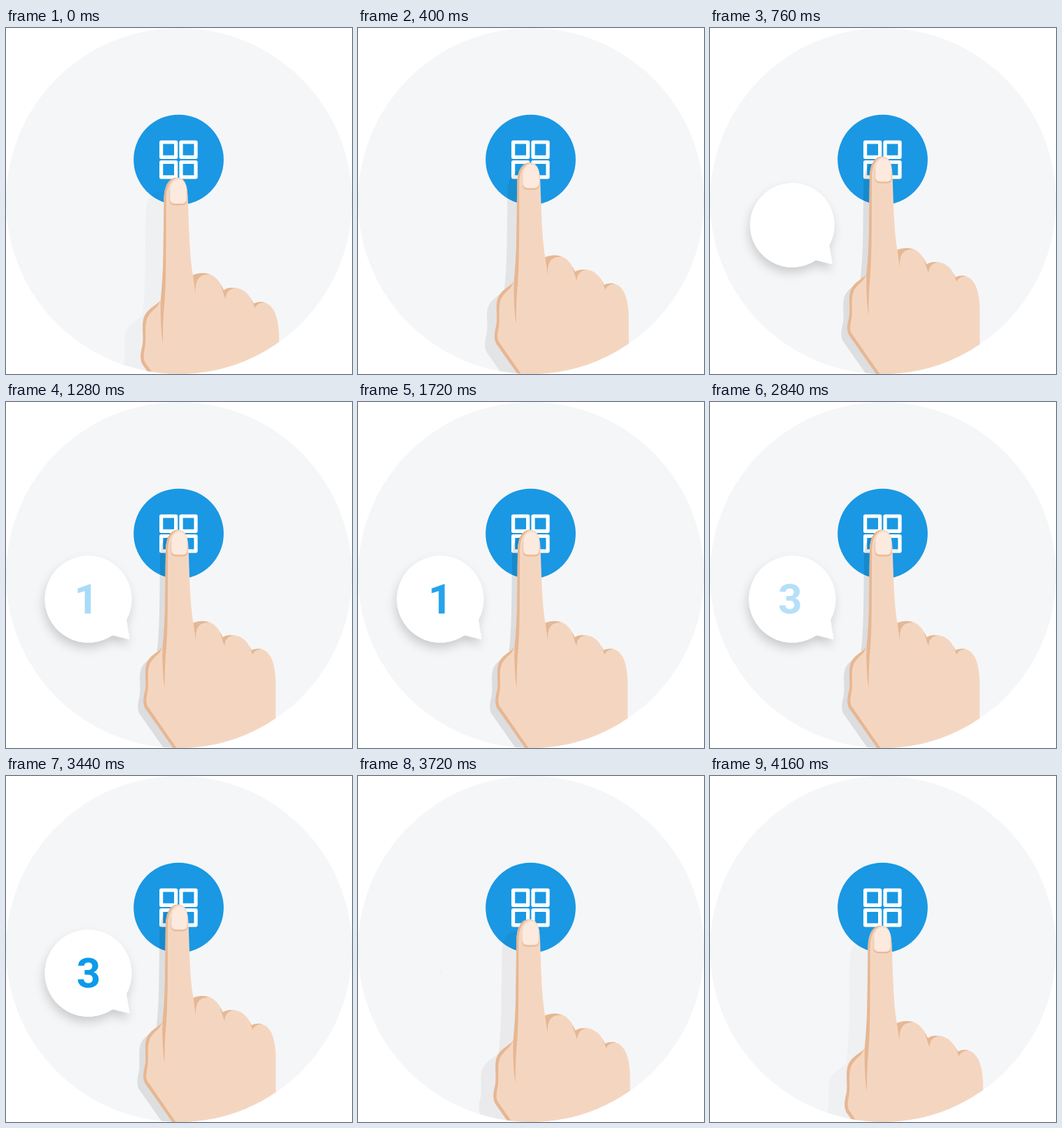
An HTML page for the animation above (4.24 s loop, 494 by 494 pixels).

```html
<!DOCTYPE html>
<html lang="en">
<head>
<meta charset="utf-8">
<title>Press and count</title>
<style>
  html, body { margin: 0; width: 100%; height: 100%; overflow: hidden; background: #fff; }
  svg { display: block; width: 100vw; height: 100vh; }
  text { font: 700 60px Roboto, Arial, sans-serif; fill: #0d9aea; }
</style>
</head>
<body>
<svg viewBox="0 0 494 494">
  <defs>
    <clipPath id="stage"><circle cx="247" cy="247" r="247"/></clipPath>
    <filter id="soft" x="-30%" y="-30%" width="160%" height="160%">
      <feDropShadow dx="-2" dy="8" stdDeviation="7" flood-color="#000" flood-opacity=".17"/>
    </filter>
    <path id="outline" d="M246 182.500C235 182.500 228.500 193 228 212L227 290C226.500 315 225 335 223.500 350
      C217 358 205 361 200.500 374C197 386 201 400 198.500 412C196 422 195 430 198.500 437L240 496L250 540H385V398
      C384 360 370 347 350.500 354.500C341 332 323 329 309.500 336C300 313 285 309 267.500 315.500
      C265 302 263 280 262 250L260.500 208C260 192 256 182.500 246 182.500Z"/>
  </defs>

  <circle cx="247" cy="247" r="247" fill="#f5f6f8"/>
  <circle cx="246.500" cy="188" r="64.300" fill="#1a98e3"/>
  <g fill="none" stroke="#fff" stroke-width="5.200" stroke-linejoin="round">
    <rect x="221.600" y="163" width="21" height="21.300"/>
    <rect x="250" y="163" width="21" height="21.300"/>
    <rect x="221.600" y="191.500" width="21" height="21.300"/>
    <rect x="250" y="191.500" width="21" height="21.300"/>
  </g>

  <g clip-path="url(#stage)">
    <use id="shadow" href="#outline"/>
    <g id="hand">
      <use href="#outline" fill="#f4d6c0"/>
      <g fill="#e6b793">
        <path d="M246 182.500C235 182.500 228.500 193 228 212L227 290C226.500 315 225 335 223.500 350
          C223 372 224 393 226.500 409C226.500 390 227 370 229 350C231 325 231 290 231 212C231 196 236 186 246 182.500Z"/>
        <path d="M223.500 350C217 358 205 361 200.500 374C197 386 201 400 198.500 412C196 422 195 430 198.500 437
          L240 496H245L202 434C199 428 201 421 202.500 411C204 398 201 386 205 375C207 369 214 363 219 358Z"/>
        <path d="M267.500 315.500C276 312 284 312 290 315C276 314 269 322 271.500 345Z"/>
        <path d="M305 328L309.500 336C314 333 320 332 325 333.500C317 334 312 340 312 349Z"/>
        <path d="M347 348L350.500 354.500C355 352 361 351.500 366 353C358 353 354 356 352 361Z"/>
      </g>
      <path d="M235.500 200V213Q235.500 220.500 243 220.500H252Q259.500 220.500 259.500 213V200Z" fill="#e6bb9b"/>
      <path d="M247.500 185C240 185 236.300 193 236.300 201V211Q236.300 217.800 243 217.800H252Q258.800 217.800 258.800 211V201
        C258.800 193 255 185 247.500 185Z" fill="#fdeadf" stroke="#f9dfd0" stroke-width="1"/>
    </g>
  </g>

  <g id="bubble">
    <path d="M152 333A62 62 0 1 1 172 311L176.500 339Z" fill="#fff" filter="url(#soft)"/>
    <text id="digit" x="118" y="301.500" text-anchor="middle">1</text>
  </g>
</svg>
<script>
const LOOP = 4240, STEP = 40;
const COUNT_START = 1000, COUNT_SLOT = 800;
const [hand, shadow, bubble, digit] =
  ["hand", "shadow", "bubble", "digit"].map(id => document.getElementById(id));

const clamp = (v, lo = 0, hi = 1) => Math.min(hi, Math.max(lo, v));
const mix = (a, b, k) => a + (b - a) * k;
const bezier = (a, b, s) => 3 * a * s * (1 - s) ** 2 + 3 * b * s * s * (1 - s) + s ** 3;

// cubic-bezier(.25, .1, .25, 1)
function ease(u) {
  if (u <= 0 || u >= 1) return clamp(u);
  let lo = 0, hi = 1;
  for (let i = 0; i < 24; i++) {
    const mid = (lo + hi) / 2;
    if (bezier(.25, .25, mid) < u) lo = mid; else hi = mid;
  }
  return bezier(.1, 1, lo);
}

const span = (t, start, length) => ease((t - start) / length);

function drawHand(press) {
  const scale = mix(1.047, 1, press);
  const x = mix(-13.2, 0, press), y = mix(22.4, 0, press);
  const place = (dx, dy) => `translate(${x + dx} ${y + dy}) scale(${scale})`;
  hand.setAttribute("transform", place(0, 0));
  shadow.setAttribute("transform", place(mix(-26, -8, press), mix(21, 8, press)));
  shadow.setAttribute("opacity", mix(.025, .1, press));
}

function drawBubble(t) {
  const size = span(t, 400, 460) - span(t, 3440, 400);
  bubble.setAttribute("visibility", size > .001 ? "visible" : "hidden");
  bubble.setAttribute("opacity", clamp(size * 1.5));
  bubble.setAttribute("transform", `translate(118 281) scale(${size}) translate(-118 -281)`);

  const elapsed = t - COUNT_START;
  const index = clamp(Math.floor(elapsed / COUNT_SLOT), 0, 2);
  const shown = clamp((elapsed - index * COUNT_SLOT) / COUNT_SLOT);
  digit.textContent = index + 1;
  digit.setAttribute("opacity", shown);
  digit.setAttribute("x", 118 - 5 * (1 - shown));
}

function render(now) {
  const t = Math.floor((now % LOOP) / STEP) * STEP;
  drawHand(span(t, 0, 1000) - span(t, 3400, 760));
  drawBubble(t);
}

const begin = performance.now();
function tick() {
  render(performance.now() - begin);
  requestAnimationFrame(tick);
}
tick();
</script>
</body>
</html>
```
